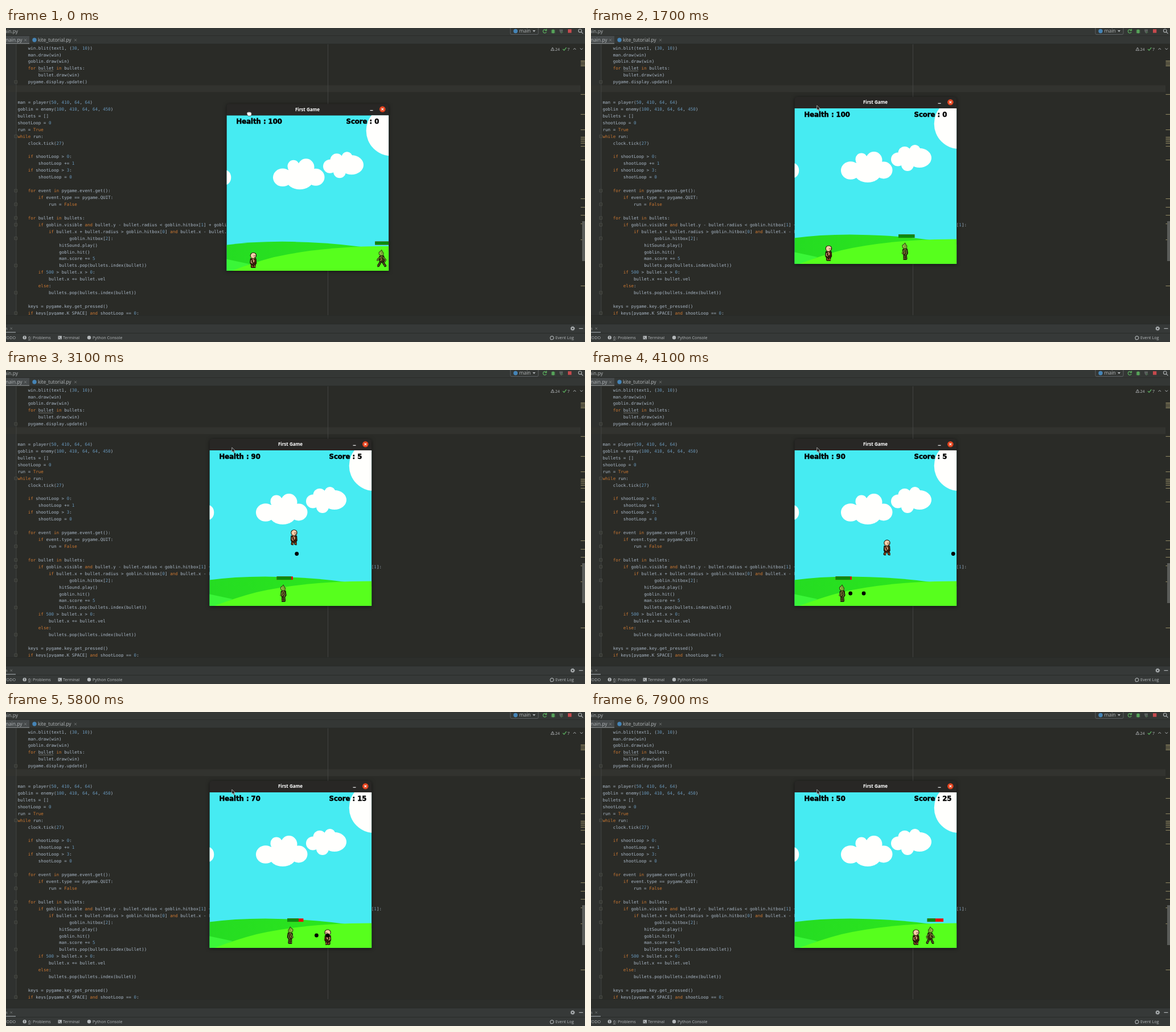
An HTML page that plays this animation: 1017x551 px, repeating every 8 s.

```html
<!DOCTYPE html>
<html lang="en">
<head>
<meta charset="utf-8">
<title>First Game</title>
<style>
html, body { margin: 0; width: 100%; height: 100%; overflow: hidden; background: #2a2b27; }
svg { display: block; width: 100vw; height: 100vh; }
text { white-space: pre; }
#code text { font: 7.54px "DejaVu Sans Mono", monospace; fill: #a9b7c6; }
.k { fill: #cc7832; }
.n { fill: #6897bb; }
.ui { font-family: "Open Sans", "Noto Sans", sans-serif; font-size: 7.2px; fill: #b4b8ba; }
.tab { font-size: 8.5px; }
.line { fill: none; stroke: #a9adaf; }
.score { font: bold 11.65px "DejaVu Sans", sans-serif; fill: #000; stroke: #000; stroke-width: .5; }
#win { filter: drop-shadow(0 1px 3px rgba(0,0,0,.55)); }
</style>
</head>
<body>
<svg viewBox="0 0 1017 551" preserveAspectRatio="none">
  <defs>
    <clipPath id="view"><rect x="357.7" y="141" width="284.4" height="272.8"/></clipPath>
    <linearGradient id="back"><stop offset="0" stop-color="#25dc22"/><stop offset="1" stop-color="#2ee91c"/></linearGradient>
  </defs>

  <rect width="1017" height="551" fill="#2a2b27"/>
  <rect y="28" width="18" height="476" fill="#2f312f"/>
  <rect y="100.5" width="1009" height="12" fill="#32332f"/>
  <path d="M18 28V504M565.5 28V504" stroke="#484a47" stroke-width=".8"/>
  <g id="code"></g>
  <path d="M57 75.3h26" stroke="#8a8d88" stroke-width=".7"/>
  <g id="folds" fill="#2a2b27" stroke="#62655f" stroke-width=".6"></g>

  <g id="marks"></g>
  <rect x="1012" y="339" width="5" height="70" fill="#5a5c59"/>
  <g class="ui">
    <path class="line" stroke-width=".8" d="M957 39.5l3-5.5 3 5.5zM960 36v2"/>
    <text x="964.5" y="39.5">24</text>
    <path d="M978 37l2.3 2.3 4-5" fill="none" stroke="#57a55a" stroke-width="1.4"/>
    <text x="986" y="39.5">7</text>
    <path class="line" d="M996.5 38l2.3-2.5 2.3 2.5M1008.5 35.5l2.3 2.5 2.3-2.5"/>
  </g>

  <rect width="1017" height="28" fill="#343735"/>
  <rect y="14" width="41" height="14" fill="#464a4b"/>
  <path d="M0 13.5H1017M0 28H1017" stroke="#282a28" stroke-width=".8"/>
  <path d="M0 27.3h41" stroke="#767a7b" stroke-width="1.4"/>
  <g class="ui tab">
    <text x="21" y="8.5" text-anchor="end">main.py</text>
    <text x="28.5" y="24" text-anchor="end">main.py</text>
    <text x="56" y="24">kite_tutorial.py</text>
    <text x="901.5" y="8.3">main</text>
  </g>
  <path class="line" stroke-width=".7" opacity=".65" d="M32 19.2l4 4m0-4l-4 4M120 19.2l4 4m0-4l-4 4"/>
  <rect x="886" y="-3" width="49" height="14.3" rx="2" fill="none" stroke="#5d6163"/>
  <path d="M925 4h5l-2.5 3z" fill="#b4b8ba"/>
  <path d="M949 4a3.1 3.1 0 1 0 .2 3M949.5 1.5v3h-3" fill="none" stroke="#57a55a" stroke-width="1.3"/>
  <ellipse cx="961" cy="6" rx="2.5" ry="3.4" fill="#57a55a"/>
  <path d="M957.5 4h7M957.5 6.2h7M957.5 8.4h7" stroke="#57a55a" stroke-width=".8"/>
  <path d="M972 2.5h6v3l-3 4q-3-2-3-7z" fill="#5c605f"/><path d="M975 5l4 2.5-4 2.5z" fill="#47634a"/>
  <rect x="987" y="2.2" width="6.3" height="6.3" fill="#c7494d"/>
  <path class="line" stroke-width="1.2" d="M1010.5 6.8l3 3M1005.5 4.8a2.8 2.8 0 1 0 5.6 0 2.8 2.8 0 1 0-5.6 0"/>

  <rect y="504" width="1017" height="16" fill="#2c2e2b"/>
  <rect y="519.5" width="1017" height="31.5" fill="#363938"/>
  <path d="M0 504.5H1017M0 519.5H1017M0 535.5H1017" stroke="#282a28" stroke-width=".9"/>
  <path d="M0 534h17" stroke="#858a8d" stroke-width="1.6"/>
  <g class="ui">
    <text x="2.5" y="529.5" text-anchor="end">main</text>
    <text x="17" y="546" text-anchor="end">TODO</text>
    <text x="39" y="546"><tspan text-decoration="underline">6</tspan>: Problems</text>
    <text x="100" y="546">Terminal</text>
    <text x="152" y="546">Python Console</text>
    <text x="965" y="546">Event Log</text>
  </g>
  <path class="line" stroke-width=".7" opacity=".65" d="M7.5 525.5l3.5 3.5m0-3.5l-3.5 3.5"/>
  <circle cx="32.7" cy="543.3" r="3.2" fill="#b4b8ba"/><path d="M32.7 541v3m0 .7v1" stroke="#363938"/>
  <rect x="91.5" y="540.3" width="6.5" height="6" fill="#b4b8ba"/><path d="M92.8 541.8l1.5 1.3-1.5 1.3M95 545h2" fill="none" stroke="#363938" stroke-width=".8"/>
  <circle cx="995.3" cy="527.3" r="2.2" fill="none" stroke="#b4b8ba" stroke-width="1.7"/>
  <circle cx="995.3" cy="527.3" r="3.5" fill="none" stroke="#b4b8ba" stroke-dasharray="1.4 1.35"/>
  <path class="line" stroke-width="1.2" d="M1006.5 527.3h7M957 546.7h2a3 3 0 1 0-2.8-1.8z"/>
  <g fill="#4584b6"><circle cx="895" cy="5.5" r="3.7"/><circle cx="50" cy="21" r="3.7"/></g>
  <circle cx="146" cy="543.3" r="3.2" fill="#b4b8ba"/>

  <g id="win">
    <path d="M357.7 141v-15q0-5 5-5h274.4q5 0 5 5v15z" fill="#282725"/>
    <text class="ui" x="499.5" y="133.3" text-anchor="middle" style="font-weight:700;font-size:8px;fill:#fff">First Game</text>
    <path d="M609.5 132.3h5" stroke="#eee" stroke-width="1.2"/>
    <circle cx="631.3" cy="130.2" r="5.3" fill="#e2431e"/>
    <path d="M629.4 128.3l3.8 3.8m0-3.8l-3.8 3.8" stroke="#fff" stroke-width="1.1"/>
    <g clip-path="url(#view)">
      <rect x="357" y="141" width="286" height="273" fill="#46ebf2"/>
      <g fill="#fffffd">
        <circle cx="647" cy="168" r="44.3"/>
        <ellipse cx="355" cy="250" rx="10.3" ry="13"/>
        <ellipse cx="456" cy="250" rx="17" ry="15.8"/><ellipse cx="486" cy="255" rx="23" ry="16"/>
        <ellipse cx="475" cy="230.5" rx="10.5" ry="11"/><ellipse cx="497" cy="232" rx="14.5" ry="15"/>
        <ellipse cx="514" cy="249.5" rx="15.5" ry="15"/><rect x="466" y="236" width="44" height="22"/>
        <ellipse cx="539" cy="230.5" rx="12" ry="12"/><circle cx="551" cy="219.5" r="11.5"/>
        <circle cx="569" cy="214.5" r="9.5"/><ellipse cx="577" cy="228" rx="21" ry="17"/>
        <ellipse cx="556" cy="240" rx="11" ry="11"/>
      </g>
      <path d="M357 368.5Q400 362.5 455 362.5Q530 363 592 371.5L643 380V414H357z" fill="url(#back)"/>
      <path d="M357 393.3L398 402L372 414H357z" fill="#3af638"/>
      <path d="M366 414Q405 399 440 390Q526 370.5 643 370.5V414z" fill="#57ff1d"/>
      <g id="bar"><rect y="362.3" width="28.4" height="5.8" fill="#e80d0d"/><rect id="life" y="362.3" height="5.8" fill="#0b8a0d"/></g>
      <g id="goblin" stroke-linejoin="round">
        <path class="leg" fill="none" stroke="#17180a" stroke-width="4"/>
        <path class="leg" fill="none" stroke="#6f7028" stroke-width="1.1"/>
        <path d="M-4-4l4-1.5 4 2.5v8l-2 2h-5l-2-3z" fill="#39330f" stroke="#120f06"/>
        <path d="M-1-3l3 2-2 3 2 3" fill="none" stroke="#a08a47" stroke-width="1.2"/>
        <path d="M0-14.6l2 2.6 2.6 1.6-.3 4-2.4 2.2h-3.4l-2.2-3z" fill="#7fa738" stroke="#1d290b" stroke-width=".9"/>
        <path d="M-2-10l-2.5-.5 2 3.2" fill="#4f7420"/>
        <path d="M2.2-8.6h1.4" stroke="#fff2a0"/>
        <path class="arm" fill="none" stroke="#17180a" stroke-width="2.7"/>
        <path class="arm" fill="none" stroke="#86a03c" stroke-width="1.1"/>
      </g>
      <g id="man" stroke-linejoin="round">
        <path class="leg" fill="none" stroke="#1c0e07" stroke-width="4.4"/>
        <path class="leg" fill="none" stroke="#a2622d" stroke-width="1.4"/>
        <path d="M-5-2.5h9.5l.6 8-1.6 2.5h-7.5l-1.5-3z" fill="#52290f" stroke="#1c0f08" stroke-width="1.3"/>
        <path d="M-1-1.5l2 2.5-1 3" fill="none" stroke="#e9b58d" stroke-width="1.5"/>
        <path d="M-4.5 5.2h8.5" stroke="#1c0f08" stroke-width="1.6"/>
        <path class="arm" fill="none" stroke="#1c0f08" stroke-width="3.4"/>
        <path class="arm" fill="none" stroke="#dfa87e" stroke-width="1.4"/>
        <ellipse cy="-8" rx="5.2" ry="5" fill="#f7cfaa" stroke="#2a180e" stroke-width="1.1"/>
        <path d="M-4-5.5q2 3 6 2" fill="none" stroke="#bd8761" stroke-width="1.2"/>
        <path d="M1.4-8.5v2M3.8-8.5v2M1.5-4.6h2.5" stroke="#2a180e" stroke-width=".9"/>
      </g>
      <g id="shots"></g>
      <text class="score" id="health" x="374.5" y="156"></text>
      <text class="score" id="score" x="567.5" y="156"></text>
    </g>
    <path id="arrow" d="M396.8 136v8.2l1.9-1.8 1.6 3.2 1.5-.8-1.6-3h2.6z" fill="#171717" stroke="#ddd" stroke-width=".7"/>
    <path id="hand" d="M393 137l1.5-2 1 1 1-1.7 1.3 1.5 1.4-1.3.8 1.7 1.2-.3v4l-1.7 2.3h-4l-2-2.5z" fill="#f4f4f4" stroke="#222" stroke-width=".6"/>
  </g>
</svg>
<script>
const $ = id => document.getElementById(id);
const rowY = row => 35 + row * 11.93;

const source = `    win.blit(text1, (30, 10))
    man.draw(win)
    goblin.draw(win)
    for bullet in bullets:
        bullet.draw(win)
    pygame.display.update()


man = player(50, 410, 64, 64)
goblin = enemy(100, 410, 64, 64, 450)
bullets = []
shootLoop = 0
run = True
while run:
    clock.tick(27)

    if shootLoop > 0:
        shootLoop += 1
    if shootLoop > 3:
        shootLoop = 0

    for event in pygame.event.get():
        if event.type == pygame.QUIT:
            run = False

    for bullet in bullets:
        if goblin.visible and bullet.y - bullet.radius < goblin.hitbox[1] + goblin.hitbox[3] and bullet.y + bullet.radius > goblin.hitbox[1]:
            if bullet.x + bullet.radius > goblin.hitbox[0] and bullet.x - bullet.radius < goblin.hitbox[0] + \\
                    goblin.hitbox[2]:
                hitSound.play()
                goblin.hit()
                man.score += 5
                bullets.pop(bullets.index(bullet))
        if 500 > bullet.x > 0:
            bullet.x += bullet.vel
        else:
            bullets.pop(bullets.index(bullet))

    keys = pygame.key.get_pressed()
    if keys[pygame.K_SPACE] and shootLoop == 0:`;

const paint = line => line
  .replace(/</g, '&lt;').replace(/>/g, '&gt;')
  .replace(/\b(for|in|if|and|else|while|True|False)\b|\b\d+\b/g,
    (word, key) => `<tspan class="${key ? 'k' : 'n'}">${word}</tspan>`);

$('code').innerHTML = source.split('\n').map((line, row) => {
  const body = line.trimStart();
  const x = 20.5 + (line.length - body.length) * 4.541;
  return `<text x="${x}" y="${rowY(row) + 2.6}">${paint(body)}</text>`;
}).join('');

$('folds').innerHTML = [5, 13, 21, 23, 25, 26, 28, 32, 36, 39]
  .map(row => `<path d="M15 ${rowY(row) - 2.3}h4.6v4.6h-4.6zM16 ${rowY(row)}h2.6"/>`).join('');

$('marks').innerHTML = [57, 59, 61.5, 64, 66, 116, 151, 178, 191, 193.5, 196, 199, 202, 207, 231, 299, 314, 328, 343, 371, 452]
  .map(y => `<rect x="1009.5" y="${y}" width="7.5" height="1.1" fill="#8c8460"/>`).join('');

// Player track: time in seconds, centre x
const track = [[0, 404.5], [1.594, 404.5], [1.99, 453], [2.66, 453], [3.1, 506], [3.3, 530],
  [3.55, 500], [3.94, 500], [4.1, 520], [4.89, 617], [5.38, 617], [5.64, 565],
  [6.3, 565], [6.86, 496], [7.03, 496], [7.64, 571], [8, 571]];
const jumpPeaks = [2.94, 4.34, 6.58, 7.48];
const halfJump = 0.39, jumpHeight = 109;

// Bullets: start, end, x, y, direction, hits the goblin
const bullets = [
  [2.35, 2.75, 453, 392, 1, 1], [2.64, 4.14, 453, 322.5, 1, 0],
  [3.75, 4.15, 499.6, 392, -1, 1], [3.93, 4.28, 500.4, 392, -1, 1],
  [5.38, 5.58, 617, 392, 1, 0],
  [5.64, 5.99, 565.5, 392, -1, 1], [5.8, 6.09, 565, 392, -1, 1]];
const turn = 4.25;

function player(t) {
  let x = track[0][1], face = 1, moving = false;
  for (let i = 1; i < track.length; i++) {
    const [t0, x0] = track[i - 1], [t1, x1] = track[i];
    if (t < t0) break;
    x = x0 + (x1 - x0) * Math.min(1, (t - t0) / (t1 - t0));
    moving = x1 !== x0 && t < t1;
    if (x1 !== x0) face = Math.sign(x1 - x0);
  }
  const peak = jumpPeaks.find(p => Math.abs(t - p) < halfJump);
  const lift = peak ? jumpHeight * (1 - Math.abs((t - peak) / halfJump) ** 3) : 0;
  return { x, y: 395 - lift, face, moving };
}

function pose(id, x, y, face, leg, arm) {
  const el = $(id);
  el.setAttribute('transform', `translate(${x} ${y}) scale(${face} 1)`);
  el.querySelectorAll('.leg').forEach(p => p.setAttribute('d', leg));
  el.querySelectorAll('.arm').forEach(p => p.setAttribute('d', arm));
}

function draw(t) {
  const u = Math.min(1, Math.max(0, (t - 0.1) / 0.6));
  const away = 1 - u * u * (3 - 2 * u);
  $('win').setAttribute('transform', `translate(${30 * away} ${12.3 * away})`);
  $('hand').style.display = away > 0 ? '' : 'none';
  $('arrow').style.display = away > 0 ? 'none' : '';

  const hits = bullets.filter(b => b[5] && t >= b[1]).length;
  $('health').textContent = `Health : ${100 - hits * 10}`;
  $('score').textContent = `Score : ${hits * 5}`;

  // The walk cycle restarts when the goblin turns round
  const right = t > turn;
  const barX = 422.7 + 46 * Math.abs(t - turn);
  $('bar').setAttribute('transform', `translate(${barX} 0)`);
  $('life').setAttribute('width', 28.4 - 2.84 * hits);
  const cycle = (right ? t - turn : t) / 1.185;
  const s = Math.max(0, Math.cos(cycle * 2 * Math.PI)) ** 2;
  const spread = 2 + 4.5 * s;
  pose('goblin', barX + (right ? 5.3 : 11.5), 391.5, right ? 1 : -1,
    `M-1 5L${-spread} 13.5h2M1 5L${spread - 1} 13.5h2`,
    `M-2-2L${-3 - 4 * s} 3l2 4M2-2l${1.5 + 3 * s} 4 1 3`);

  const man = player(t);
  const step = man.moving ? 2 * Math.sin(t * 11) : 0;
  pose('man', man.x, man.y, man.face,
    `M-2 7L${-2.5 - step} 11.6h2.4M2 7L${1.5 + step} 11.6h2.4`,
    `M-3.5 0L${-4 + step / 2} 4l2.5 1.5`);

  $('shots').innerHTML = bullets.filter(b => t >= b[0] && t < b[1])
    .map(([t0, , x, y, dir]) => `<circle cx="${x + dir * 125.5 * (t - t0)}" cy="${y}" r="3.4"/>`).join('');
}

const start = performance.now();
function tick() {
  const ms = (performance.now() - start) % 8000;
  draw(Math.floor(ms / 100) / 10);
  requestAnimationFrame(tick);
}
tick();
</script>
</body>
</html>
```
